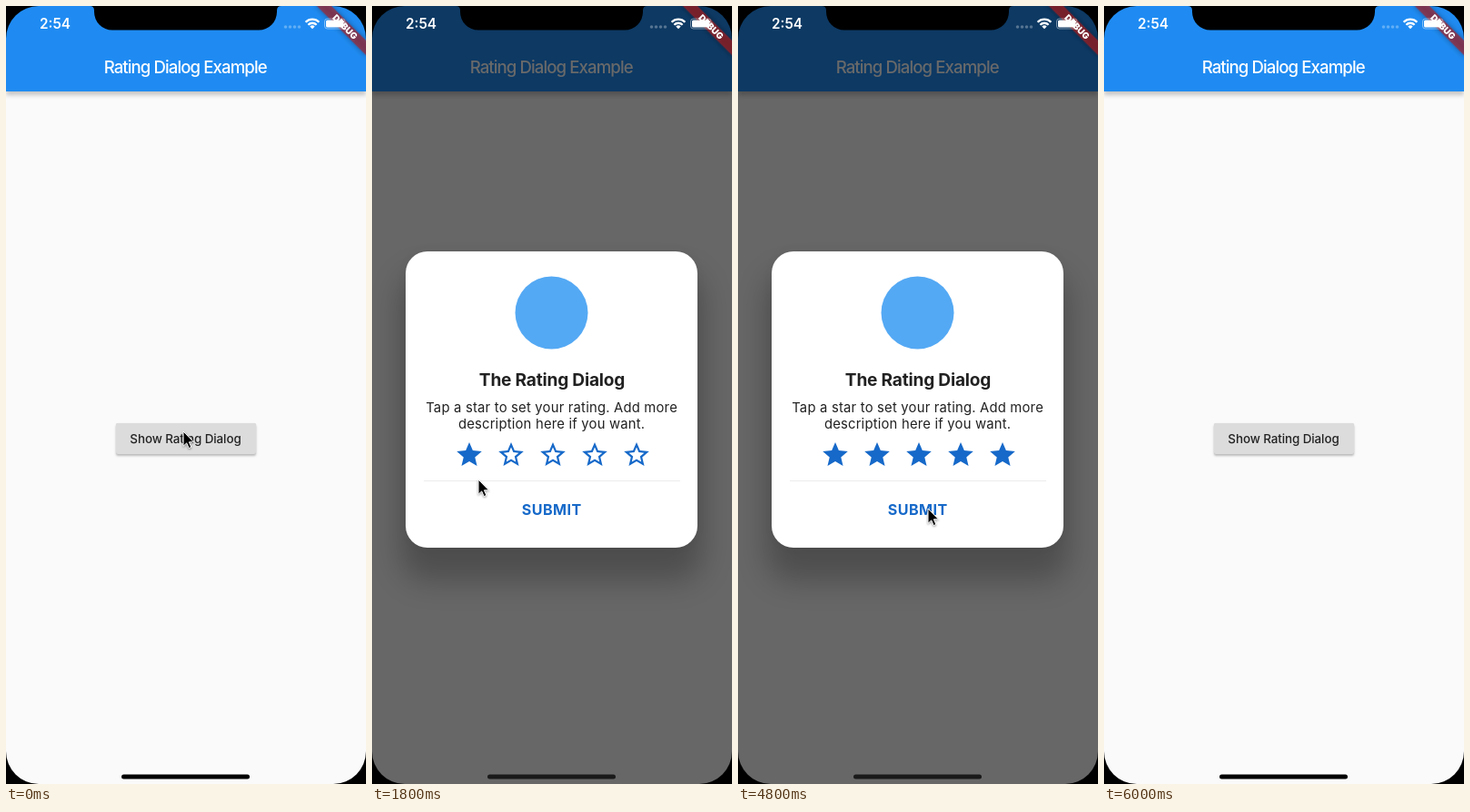
An HTML page that plays this animation: 396 px wide and 856 px high, repeating every 6.1 s.

```html
<!DOCTYPE html>
<html lang="en">
<head>
<meta charset="utf-8">
<title>Rating dialog</title>
<style>
  html, body { margin: 0; width: 100%; height: 100%; overflow: hidden; background: #fafafa; }
  body, div, svg { position: absolute; }
  body { font-family: Inter, sans-serif; }
  svg { left: 0; top: 0; overflow: visible; }
  .full { left: 0; top: 0; width: 396px; height: 856px; }
  .mid { text-anchor: middle; }
  #bar { left: 0; top: 0; width: 396px; height: 94px; background: #1f8bf2; box-shadow: 0 4px 5px #00000038; }
  #open { left: 121px; top: 459px; width: 154px; height: 34px; border-radius: 2px; background: #dcdcdc;
    box-shadow: 0 2px 2.5px #00000040, 0 0 1px #0002; }
  #barrier { background: #000; }
  #card { left: 37px; width: 321px; border-radius: 24px; background: #fff;
    box-shadow: 0 30px 32px 6px #00000040, 0 0 12px #0000000a; }
</style>
</head>
<body>
<div id="bar"></div>
<div id="open"></div>
<svg width="396" height="856" class="mid" font-weight="500">
  <text x="197.2" y="74" font-size="18.6" letter-spacing="-.9" fill="#fff">Rating Dialog Example</text>
  <text x="197.5" y="481" font-size="13.4" letter-spacing="-.08" fill="#222">Show Rating Dialog</text>
</svg>
<div id="barrier" class="full"></div>

<div id="card">
  <svg width="321" height="326" viewBox="-.5 0 321 326" class="mid" fill="#212121">
    <circle cx="160" cy="67.5" r="40" fill="#54a9f4"/>
    <text x="160.5" y="148" font-size="19.1" font-weight="700" letter-spacing="-.2">The Rating Dialog</text>
    <g font-size="14.8" letter-spacing=".21">
      <text x="160.1" y="177">Tap a star to set your rating. Add more</text>
      <text x="160.1" y="195.3">description here if you want.</text>
    </g>
    <g id="stars" fill="#1669c9" fill-rule="evenodd"></g>
    <g id="footer">
      <path d="M19.5 252.5H301.5" stroke="#ececec"/>
      <rect id="press" x="111.5" y="266" width="97" height="34.5" rx="2" fill="#000" fill-opacity=".12"/>
      <text x="160.2" y="289.5" font-size="16.1" font-weight="700" letter-spacing=".45" fill="#1669c9">SUBMIT</text>
    </g>
  </svg>
</div>

<svg width="396" height="856">
  <g transform="translate(396 0) rotate(45)">
    <rect x="-40" y="26.8" width="80" height="11.5" fill="#b71c1c" fill-opacity=".63"
      style="filter: drop-shadow(0 0 3px #0008)"/>
    <text class="mid" y="36" font-size="9.8" font-weight="900" fill="#fff">DEBUG</text>
  </g>
  <g fill="#fff">
    <text x="37" y="25" font-size="15.3" font-weight="600">2:54</text>
    <g fill-opacity=".3">
      <circle cx="307.5" cy="23" r="1.8"/><circle cx="312.5" cy="23" r="1.8"/>
      <circle cx="317.5" cy="23" r="1.8"/><circle cx="322.5" cy="23" r="1.8"/>
    </g>
    <path d="M329.6 17.8A10.3 10.3 0 0 1 344.4 17.8M332.4 20.7A6.4 6.4 0 0 1 341.6 20.7"
      fill="none" stroke="#fff" stroke-width="2.3"/>
    <path d="M337 25.3L334.3 22.6A3.8 3.8 0 0 1 339.7 22.6Z"/>
    <rect x="350.5" y="14" width="22.5" height="11" rx="3" fill="none" stroke="#fff" stroke-opacity=".45"/>
    <rect x="352" y="15.5" width="19.5" height="8" rx="1.6"/>
    <path d="M374.3 17.8q2 1.7 0 3.4z" fill-opacity=".45"/>
  </g>
  <path d="M0 0H396V856H0ZM36 0A36 36 0 0 0 0 36V820A36 36 0 0 0 36 856H360A36 36 0 0 0 396 820V36A36 36 0 0 0 360 0Z"
    fill-rule="evenodd"/>
  <path d="M92 0Q97 0 97 5V6.5A20 20 0 0 0 117 26.5H278A20 20 0 0 0 298 6.5V5Q298 0 303 0Z"/>
  <rect id="home" x="127" y="845.5" width="141" height="5" rx="2.5"/>
  <path id="cursor" d="M0 0V16.3L3.7 12.9 6.2 18.6 8.9 17.4 6.4 11.8H11.5Z" stroke="#fff"
    style="filter: drop-shadow(0 1px 1px #0006)"/>
</svg>

<script>
const LOOP = 6100;
const FULL_STAR = 'M22 9.24l-7.19-.62L12 2 9.19 8.63 2 9.24l5.46 4.73L5.82 21 12 17.27 18.18 21l-1.63-7.03z';
const EMPTY_STAR = FULL_STAR + 'M12 15.4l-3.76 2.27 1-4.28-3.32-2.88 4.38-.38L12 6.1l1.71 4.04 4.38.38-3.32 2.88 1 4.28z';
const TAPS = [1600, 2500, 3050, 3700, 4250];
const SHOW = 300, HIDE = 5340, FADE = 150;

// Pointer stops: time, x, y
const STOPS = [
  [0, 195, 468], [800, 195, 468], [1200, 117, 521], [2150, 117, 521], [2380, 154, 496],
  [2750, 154, 496], [2950, 198, 497], [3200, 198, 497], [3450, 238, 491], [3850, 238, 491],
  [4050, 287, 495], [4400, 287, 495], [4700, 209, 553], [4950, 209, 553], [5150, 199, 552],
  [5550, 199, 552], [6000, 430, 60], [LOOP, 430, 60]
];

const $ = id => document.getElementById(id);
const clamp = v => Math.min(1, Math.max(0, v));
const between = (t, from, to) => t >= from && t < to;

const stars = TAPS.map((_, i) => {
  const star = document.createElementNS('http://www.w3.org/2000/svg', 'path');
  star.setAttribute('transform', `translate(${69.5 + 46 * i} 223) scale(1.38) translate(-12 -11.5)`);
  return $('stars').appendChild(star);
});

function pointerAt(t) {
  const i = STOPS.findIndex(stop => stop[0] > t);
  const [t0, x0, y0] = STOPS[i - 1], [t1, x1, y1] = STOPS[i];
  const p = (t - t0) / (t1 - t0), e = p * p * (3 - 2 * p);
  return [x0 + (x1 - x0) * e, y0 + (y1 - y0) * e];
}

function draw(t) {
  const left = 1 - clamp(t < 3000 ? (t - SHOW) / FADE : 1 - (t - HIDE) / FADE);
  const dim = 1 - left ** 3;
  $('barrier').style.opacity = 0.59 * dim;
  $('card').style.opacity = 1 - left ** 2;
  $('home').style.fill = `rgb(${Array(3).fill(Math.round(26 * dim))})`;
  $('open').style.background = between(t, 150, 450) ? '#c3c3c3' : '#dcdcdc';

  const rated = t >= TAPS[0];
  $('card').style.top = (rated ? 270 : 301) + 'px';
  $('card').style.height = (rated ? 326 : 264) + 'px';
  $('footer').style.display = rated ? '' : 'none';
  $('press').style.display = t >= 5250 ? '' : 'none';
  stars.forEach((star, i) => star.setAttribute('d', t >= TAPS[i] ? FULL_STAR : EMPTY_STAR));

  $('cursor').setAttribute('transform', `translate(${pointerAt(t)})`);
}

const start = performance.now();
function tick() {
  draw((performance.now() - start) % LOOP);
  requestAnimationFrame(tick);
}
tick();
</script>
</body>
</html>
```
